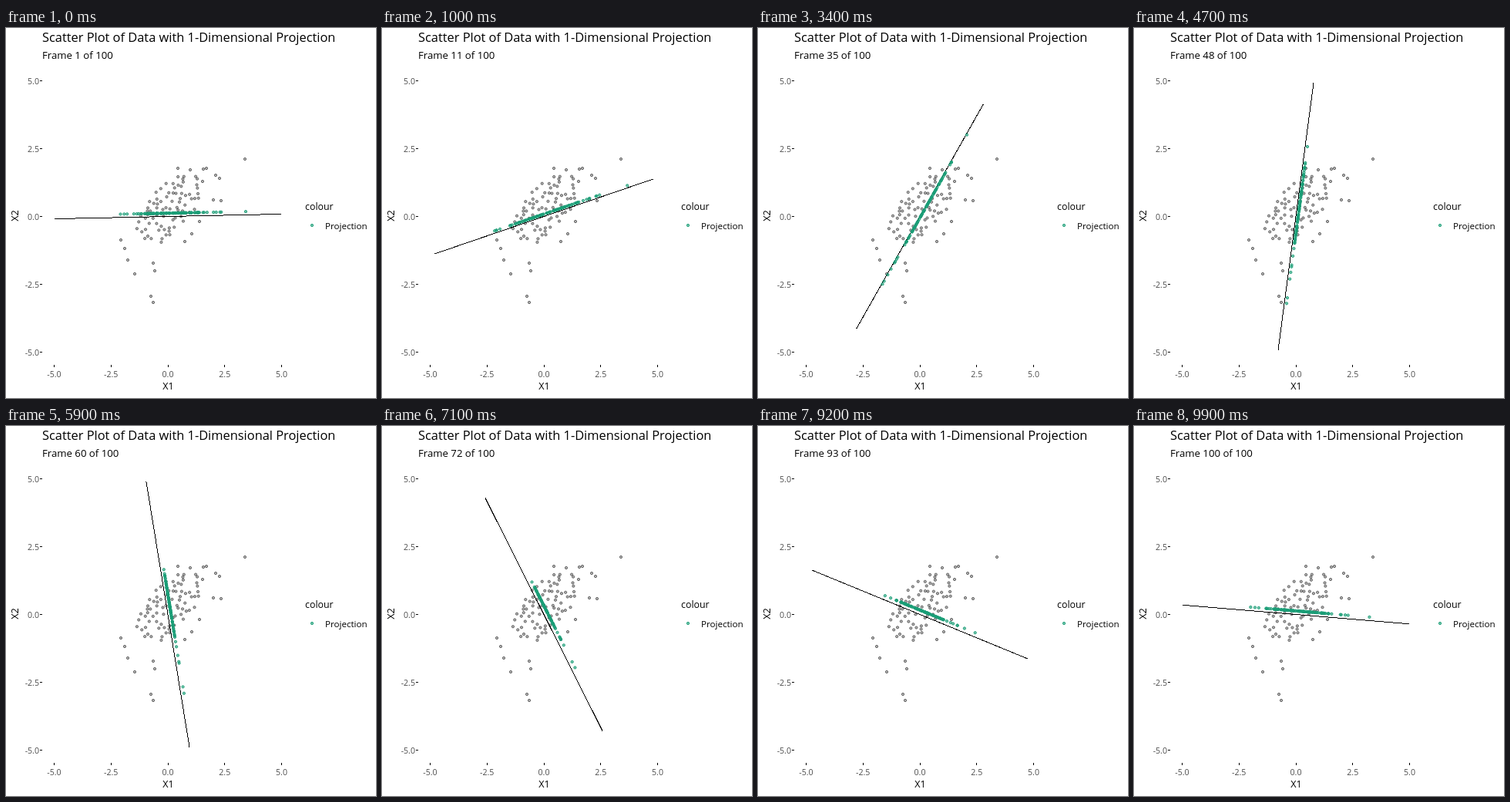
These frames come from a looping animation (480x480 px, 10000 ms). An HTML page:

```html
<!DOCTYPE html>
<html lang="en">
<head>
<meta charset="utf-8">
<title>1-Dimensional Projection</title>
<style>
html, body { margin: 0; width: 100%; height: 100%; overflow: hidden; background: #fff; }
svg { display: block; width: 480px; height: 480px; font-family: "Open Sans", "Noto Sans", sans-serif; }
.tick { font-size: 10.6px; fill: #4d4d4d; }
.line { stroke: #000; shape-rendering: crispEdges; }
.data { fill: rgba(0, 0, 0, .3); stroke: rgba(0, 0, 0, .48); }
.proj { fill: rgba(27, 158, 119, .6); stroke: rgba(27, 158, 119, .9); }
</style>
</head>
<body>
<svg id="plot" viewBox="0 0 480 480">
  <text x="47" y="18" font-size="16.4">Scatter Plot of Data with 1-Dimensional Projection</text>
  <text id="count" x="47" y="40" font-size="13.2"></text>
  <text x="210.5" y="469" font-size="12.5" text-anchor="middle">X1</text>
  <text transform="translate(16 243.5) rotate(-90)" font-size="12.8" text-anchor="middle">X2</text>
  <text x="388" y="236" font-size="12.4">colour</text>
  <text x="414" y="261" font-size="11.6">Projection</text>
</svg>
<script>
const plot = document.getElementById('plot');
const count = document.getElementById('count');
const X0 = 210, Y0 = 244.5, SX = 29.5, SY = 35.2;   // origin and pixels per unit
const MX = 0.12, MY = 0.123;                        // mean of the data

function set(el, attrs) {
  for (const key in attrs) el.setAttribute(key, attrs[key]);
  return el;
}
function add(tag, attrs, text = '') {
  const el = set(document.createElementNS('http://www.w3.org/2000/svg', tag), attrs);
  el.textContent = text;
  return plot.appendChild(el);
}
const dot = (cls, cx, cy) => add('circle', { class: cls, cx, cy, r: 1.65 });

for (let v = -5; v <= 5; v += 2.5) {
  const x = X0 + v * SX, y = Y0 - v * SY, label = v.toFixed(1);
  add('line', { class: 'line', x1: x, x2: x, y1: 437, y2: 440 });
  add('line', { class: 'line', x1: 44, x2: 47, y1: y, y2: y });
  add('text', { class: 'tick', x, y: 453, 'text-anchor': 'middle' }, label);
  add('text', { class: 'tick', x: 43, y: y + 4, 'text-anchor': 'end' }, label);
}

// Outlying points; the core of the cloud is random.
const points = [
  [310, 170], [223, 182], [239, 184], [256, 183], [260, 182], [272, 191], [277, 195],
  [255, 199], [269, 223], [279, 224], [251, 251], [241, 267], [232, 277], [149, 275],
  [154, 286], [158, 301], [167, 319], [191, 305], [193, 315], [188, 348], [191, 356]
];
let seed = 7;
function random() {
  seed = seed * 16807 % 2147483647;
  return seed / 2147483647;
}
// A tilted ellipse, without overlapping dots.
while (points.length < 98) {
  const turn = random() * 2 * Math.PI, r = random() ** 0.5;
  const along = 58 * r * Math.cos(turn), across = 28 * r * Math.sin(turn);
  const x = 211 + 0.63 * along + 0.78 * across;
  const y = 236 - 0.78 * along + 0.63 * across;
  if (points.every(p => Math.hypot(p[0] - x, p[1] - y) > 3.5)) points.push([x, y]);
}

points.forEach(([x, y]) => dot('data', x, y));
const axis = add('line', { class: 'line' });
const shadows = points.map(() => dot('proj', 0, 0));
dot('proj', 397, 256);

function draw() {
  const n = Math.floor(performance.now() / 100) % 100;
  // Each angle holds for three steps, near the end for two.
  const state = n < 86 ? Math.floor((n + 1) / 3) : Math.floor(n / 2) - 14;
  const angle = (1 + 5 * state) * Math.PI / 180;
  const c = Math.cos(angle), s = Math.sin(angle);

  count.textContent = `Frame ${n + 1} of 100`;
  set(axis, {
    x1: X0 - 5 * c * SX, y1: Y0 + 5 * s * SY,
    x2: X0 + 5 * c * SX, y2: Y0 - 5 * s * SY
  });
  points.forEach(([x, y], i) => {
    const d = ((x - X0) / SX - MX) * c + ((Y0 - y) / SY - MY) * s;
    set(shadows[i], { cx: X0 + (MX + d * c) * SX, cy: Y0 - (MY + d * s) * SY });
  });
  requestAnimationFrame(draw);
}
draw();
</script>
</body>
</html>
```
